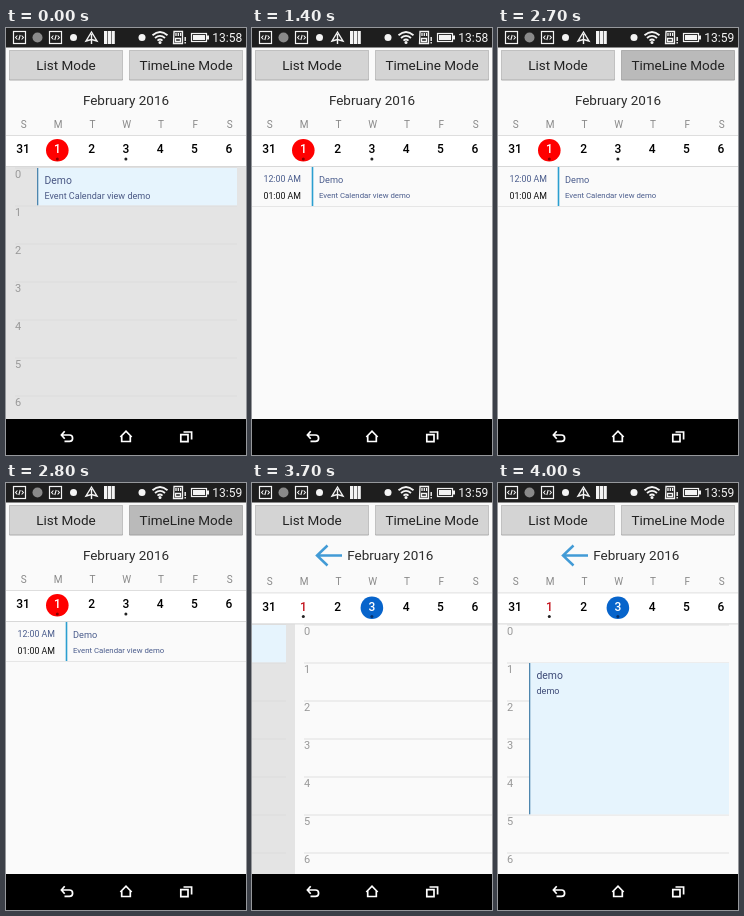
An HTML page that plays this animation: 240 by 427 pixels, repeating every 4.1 s.

```html
<!DOCTYPE html>
<html lang="en">
<head>
<meta charset="utf-8">
<title>Calendar view demo</title>
<style>
  html, body { margin: 0; width: 100%; height: 100%; overflow: hidden; background: #fafafa; }
  svg { display: block; width: 100%; height: 100%; font-family: Roboto, sans-serif; }
</style>
</head>
<body>
<svg id="stage" viewBox="0 0 240 427" xmlns="http://www.w3.org/2000/svg"></svg>
<script>
const LOOP = 4100;
const ROW = 38;
const stage = document.getElementById('stage');

const rect = (x, y, w, h, fill, extra = '') =>
  `<rect x="${x}" y="${y}" width="${w}" height="${h}" fill="${fill}" ${extra}/>`;
const circle = (x, y, r, fill) => `<circle cx="${x}" cy="${y}" r="${r}" fill="${fill}"/>`;
const path = (d, stroke = '#fff', width = 1, fill = 'none') =>
  `<path d="${d}" fill="${fill}" stroke="${stroke}" stroke-width="${width}"/>`;
const text = (s, x, y, size, fill, anchor = 'start', weight = 400) =>
  `<text x="${x}" y="${y}" font-size="${size}" fill="${fill}" text-anchor="${anchor}" font-weight="${weight}">${s}</text>`;
const move = (x, y, body) => `<g transform="translate(${x} ${y})">${body}</g>`;

function codeIcon(x) {
  return move(x, 3, rect(.5, .5, 12, 12, 'none', 'stroke="#f4f4f4" stroke-width="1.2"') +
    path('M4.4 4.5 2.6 6.5 4.4 8.5M8.6 4.5 10.4 6.5 8.6 8.5M7.2 4 5.8 9', '#f4f4f4', 1.1));
}

function statusBar(clock) {
  const bars = [98, 101.8, 105.6].map(x => rect(x, 3, 3.2, 13, '#f4f4f4')).join('');
  return rect(0, 0, 240, 19.5, '#1e1e1e') +
    codeIcon(7) + circle(31.5, 9.5, 5, '#8a8a8a') + codeIcon(43) +
    circle(67.5, 9.5, 3.5, '#f4f4f4') +
    path('M85.5 4 91 13 85.5 11.5 80 13ZM85.5 6V16', '#f4f4f4', 1.4) + bars +
    circle(136, 9.5, 3.5, '#f4f4f4') +
    path('M146.5 7.3Q154 .8 161.5 7.3M149 10Q154 5.7 159 10M151.5 12.6Q154 10.5 156.5 12.6', '#f4f4f4', 1.8) +
    circle(154, 14.6, 1.5, '#f4f4f4') +
    path('M168 3.5H176.5V15.5H167.5ZM170 5V8M172.3 5V8M174.6 5V8M169.5 10.5H174.5V13.5H169.5Z', '#f4f4f4', 1.3) +
    rect(178.5, 9, 1.4, 4, '#f4f4f4') + rect(178.5, 14, 1.4, 1.5, '#f4f4f4') +
    rect(185.5, 5.5, 15, 8, 'none', 'stroke="#f4f4f4" stroke-width="1.2"') +
    rect(187, 7, 12, 5, '#f4f4f4') + rect(201, 7.5, 2, 4, '#f4f4f4') +
    text(clock, 236.2, 14, 12, '#f4f4f4', 'end');
}

function button(label, x, pressed) {
  return rect(x, 22, 114, 30.5, pressed ? '#a2a2a2' : '#aeaeae', 'rx="1"') +
    rect(x + .5, 22.5, 113, 29, pressed ? '#bababa' : '#d4d4d4', 'rx="1"') +
    text(label, x + 57, 42, 13.5, '#222', 'middle');
}

// Month title, weekday letters and the row of dates.
function header(day3) {
  const shift = day3 ? 2.4 : 0;
  const chosen = day3 ? 3 : 1;
  let out = day3
    ? path('M90 72.5H65M75.5 62.5 65 72.5 75.5 82.5', '#429bd6', 2.5) +
      text('February 2016', 138.3, 77, 13.5, '#2c2c2c', 'middle')
    : text('February 2016', 120, 77, 13.5, '#2c2c2c', 'middle');
  let strip = rect(0, 107, 240, 31.5, '#fff') +
    rect(0, 107, 240, 1, '#dedede') + rect(0, 138, 240, 1, '#d8d8d8');
  [31, 1, 2, 3, 4, 5, 6].forEach((date, i) => {
    const x = 17 + i * 34.3;
    const on = date === chosen;
    strip += text('SMTWTFS'[i], x + .8, 100, 10, '#888', 'middle');
    if (on) strip += circle(x, 122.3, 11.3, day3 ? '#0764cb' : '#f00');
    const color = on ? '#fff' : date === 1 ? '#c3141e' : '#000';
    strip += text(date, x, 125.3, 12, color, 'middle', 500);
    if (date === 1 || date === 3)
      strip += circle(x, 131, 1.5, !on ? '#222' : day3 ? '#06306a' : '#8a0000');
  });
  return out + move(0, shift, strip);
}

function eventBox(hour, hours, title, note, ink) {
  const y = 140 + hour * ROW;
  return rect(31, y, 200, hours * ROW - .7, '#e6f4fd') +
    rect(31, y, 1.3, hours * ROW - .7, '#4e86ae') +
    text(title, 38.5, y + 16.3, 10.4, ink) + text(note, 38.5, y + 30.5, 9.05, ink);
}

function dayPage(bg, line, event) {
  let out = rect(0, 130, 240, 270, bg);
  for (let h = 0; h < 7; h++) {
    const y = 140 + h * ROW;
    out += rect(9, y - .5, 222, 1, line) + text(h, 9, y + 10, 11, '#999');
  }
  return out + event;
}

const dayOne = () =>
  dayPage('#e4e4e4', '#dedede', eventBox(0, 1, 'Demo', 'Event Calendar view demo', '#4a5884'));
const dayThree = loaded =>
  dayPage('#fafafa', '#e2e2e2', loaded ? eventBox(1, 4, 'demo', 'demo', '#3f4c78') : '');

function listPage() {
  return text('12:00 AM', 49, 154.3, 8.8, '#4a5c8c', 'end') +
    text('01:00 AM', 49, 170.7, 8.8, '#111', 'end') +
    rect(59.7, 139, 1.6, 39, '#2b9fd0') +
    text('Demo', 67, 155.3, 9.2, '#4a5c8c') +
    text('Event Calendar view demo', 67, 169.8, 7.8, '#4a5c8c') +
    rect(0, 178, 240, 1, '#e6e6e6');
}

function navBar() {
  return rect(0, 391, 240, 36, '#000') +
    path('M58.7 403.3 55.4 407 58.7 410.7M55.4 407H63.4A3.2 3.2 0 0 1 63.4 413.4H58.5', '#fff', 1.7) +
    path('M114.3 409 120 403.2 125.7 409M115.7 408V413.5H124.3V408', '#fff', 1.7) +
    path('M174.8 406.7H182V413.7H174.8ZM177.5 404H185.6V411.5', '#fff', 1.7);
}

// The swipe settles with a steep ease-out.
const swipeX = t => t < 3900 ? 43 * Math.pow(1 - (t - 3700) / 200, 2) : 0;

function content(t) {
  if (t < 1400 || (t >= 2900 && t < 3700)) return dayOne();
  if (t < 2900) return listPage();
  const x = swipeX(t);
  return move(x - 240, 2, dayOne()) + move(x, 2, dayThree(t >= 4000));
}

function draw(t) {
  stage.innerHTML = rect(0, 0, 240, 427, '#fafafa') + content(t) +
    statusBar(t < 1800 ? '13:58' : '13:59') +
    button('List Mode', 3, t >= 1300 && t < 1400) +
    button('TimeLine Mode', 123, t >= 2700 && t < 2900) +
    header(t >= 3700) + navBar();
}

let last = -1;
function tick() {
  const t = Math.floor(performance.now() % LOOP / 100) * 100;
  if (t !== last) draw(last = t);
  requestAnimationFrame(tick);
}
tick();
</script>
</body>
</html>
```
